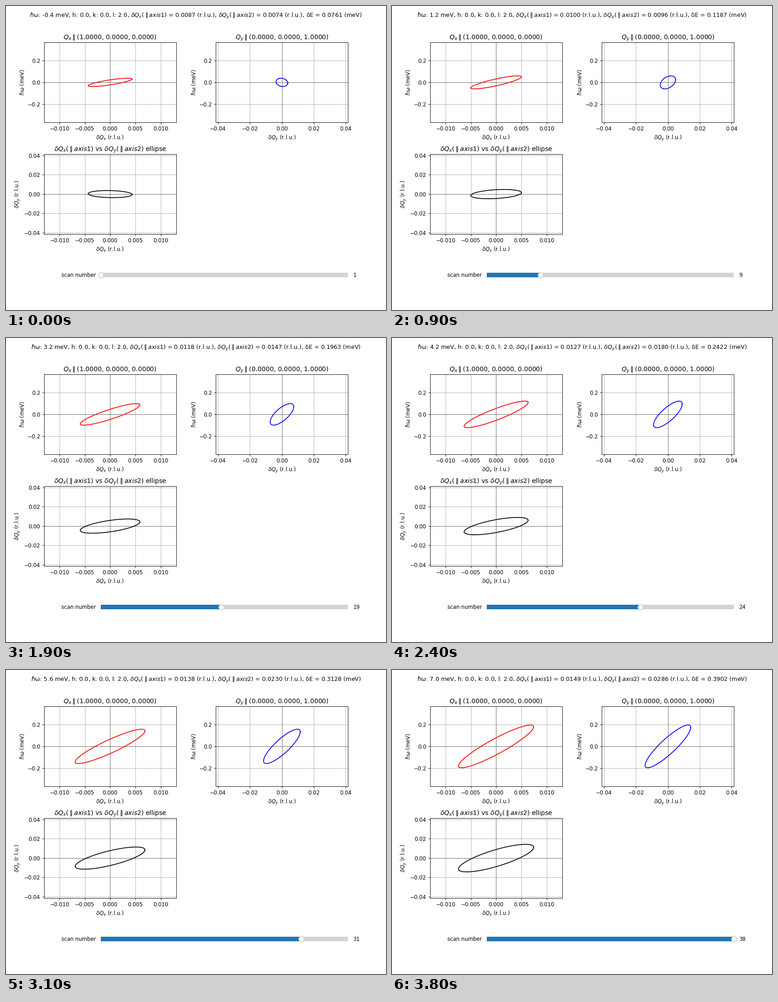
These frames come from a looping animation (837x669 px, 3.9 s). A matplotlib script:

```python
import numpy as np
import matplotlib.pyplot as plt
from matplotlib.animation import FuncAnimation
from matplotlib.widgets import Slider

DPI = 83.7
SCANS = 38
E_START, E_STEP = -0.4, 0.2

# Triple-axis spectrometer: lengths in angstrom, energies in meV, angles in arcmin
E_FINAL = 3.635
MEV_PER_K2 = 2.072
D_MONO = 3.355
COLLIMATION, MOSAIC = 40, 25
A_STAR = 4 * np.pi / (np.sqrt(3) * 2.45)
C_STAR = 2 * np.pi / 6.70
ARCMIN = np.pi / 180 / 60

LIM_QX, LIM_QY, LIM_E = 0.01308, 0.04137, 0.3637


def bragg_cot(energy):
    """Cotangent of the monochromator angle for a neutron energy."""
    return np.sqrt(energy / (MEV_PER_K2 * (np.pi / D_MONO) ** 2) - 1)


def covariance(transfer):
    """FWHM covariance of (Qx, Qy, E) at (0, 0, 2), in r.l.u. and meV."""
    e_in = E_FINAL + transfer
    ki2, kf2 = e_in / MEV_PER_K2, E_FINAL / MEV_PER_K2
    q = 2 * C_STAR
    ki_y = (ki2 - kf2 + q * q) / (2 * q)
    kf_y = ki_y - q
    perp = np.sqrt(ki2 - ki_y ** 2)
    cot_i, cot_f = bragg_cot(e_in), bragg_cot(E_FINAL)

    # Columns: wavelength spread in/out, angular spread in/out, sample mosaic
    response = np.array([
        [perp * cot_i + ki_y, kf_y - perp * cot_f, -ki_y, -kf_y, q],
        [ki_y * cot_i - perp, -kf_y * cot_f - perp, perp, perp, 0],
        [2 * e_in * cot_i, -2 * E_FINAL * cot_f, 0, 0, 0],
    ])
    response /= np.array([[A_STAR], [C_STAR], [1]])
    spread = COLLIMATION ** 2 / 2
    angular = 1 / (1 / MOSAIC ** 2 + 2 / COLLIMATION ** 2)
    variances = np.array([spread, spread, angular, angular, MOSAIC ** 2])
    return (response * variances * ARCMIN ** 2) @ response.T


def ellipse(cov, i, j):
    """Outline whose full extents equal the widths of components i and j."""
    t = np.linspace(0, 2 * np.pi, 200)
    a, b = np.sqrt(cov[i, i]) / 2, np.sqrt(cov[j, j]) / 2
    phase = np.arccos(cov[i, j] / (4 * a * b))
    return a * np.cos(t), b * np.cos(t - phase)


fig = plt.figure(figsize=(10, 669.001 / DPI), dpi=DPI)
fig.subplots_adjust(left=0.1, right=0.9, bottom=0.25, top=0.88,
                    wspace=0.3, hspace=0.4)
suptitle = fig.suptitle("", fontsize=11)


def panel(index, title, xlabel, ylabel, xlim, ylim, color):
    ax = fig.add_subplot(2, 2, index)
    ax.set(title=title, xlabel=xlabel, ylabel=ylabel,
           xlim=(-xlim, xlim), ylim=(-ylim, ylim))
    ax.grid(True)
    ax.axhline(0, color="black", lw=0.5, ls="--")
    ax.axvline(0, color="black", lw=0.5, ls="--")
    return ax.plot([], [], color=color)[0]


QX_LABEL, QY_LABEL = r"$\delta Q_x$ (r.l.u.)", r"$\delta Q_y$ (r.l.u.)"
E_LABEL = r"$\hbar$ω (meV)"
QX_AXIS = r"$\delta Q_x (\parallel axis1)$"
QY_AXIS = r"$\delta Q_y (\parallel axis2)$"

curves = [
    (panel(1, r"$Q_x \parallel$(1.0000, 0.0000, 0.0000)",
           QX_LABEL, E_LABEL, LIM_QX, LIM_E, "red"), 0, 2),
    (panel(2, r"$Q_y \parallel$(0.0000, 0.0000, 1.0000)",
           QY_LABEL, E_LABEL, LIM_QY, LIM_E, "blue"), 1, 2),
    (panel(3, f"{QX_AXIS} vs {QY_AXIS} ellipse",
           QX_LABEL, QY_LABEL, LIM_QX, LIM_QY, "black"), 0, 1),
]

slider = Slider(fig.add_axes([0.25, 0.1, 0.65, 0.03]), "scan number",
                1, SCANS, valinit=1, valstep=1, valfmt="%d")
slider.drawon = False


def update(frame):
    scan = max(1, frame)
    transfer = round(E_START + E_STEP * (scan - 1), 1) + 0.0
    cov = covariance(transfer)
    dqx, dqy, de = np.sqrt(np.diag(cov))
    for line, i, j in curves:
        line.set_data(*ellipse(cov, i, j))
    suptitle.set_text(
        rf"$\hbar$ω: {transfer:.1f} meV, h: 0.0, k: 0.0, l: 2.0, "
        f"{QX_AXIS} = {dqx:.4f} (r.l.u.), {QY_AXIS} = {dqy:.4f} (r.l.u.), "
        f"δE = {de:.4f} (meV)")
    slider.set_val(scan)
    return [line for line, _, _ in curves] + [suptitle]


anim = FuncAnimation(fig, update, frames=SCANS + 1, interval=100,
                     init_func=lambda: update(0), repeat=True, blit=False)
plt.show()
```
